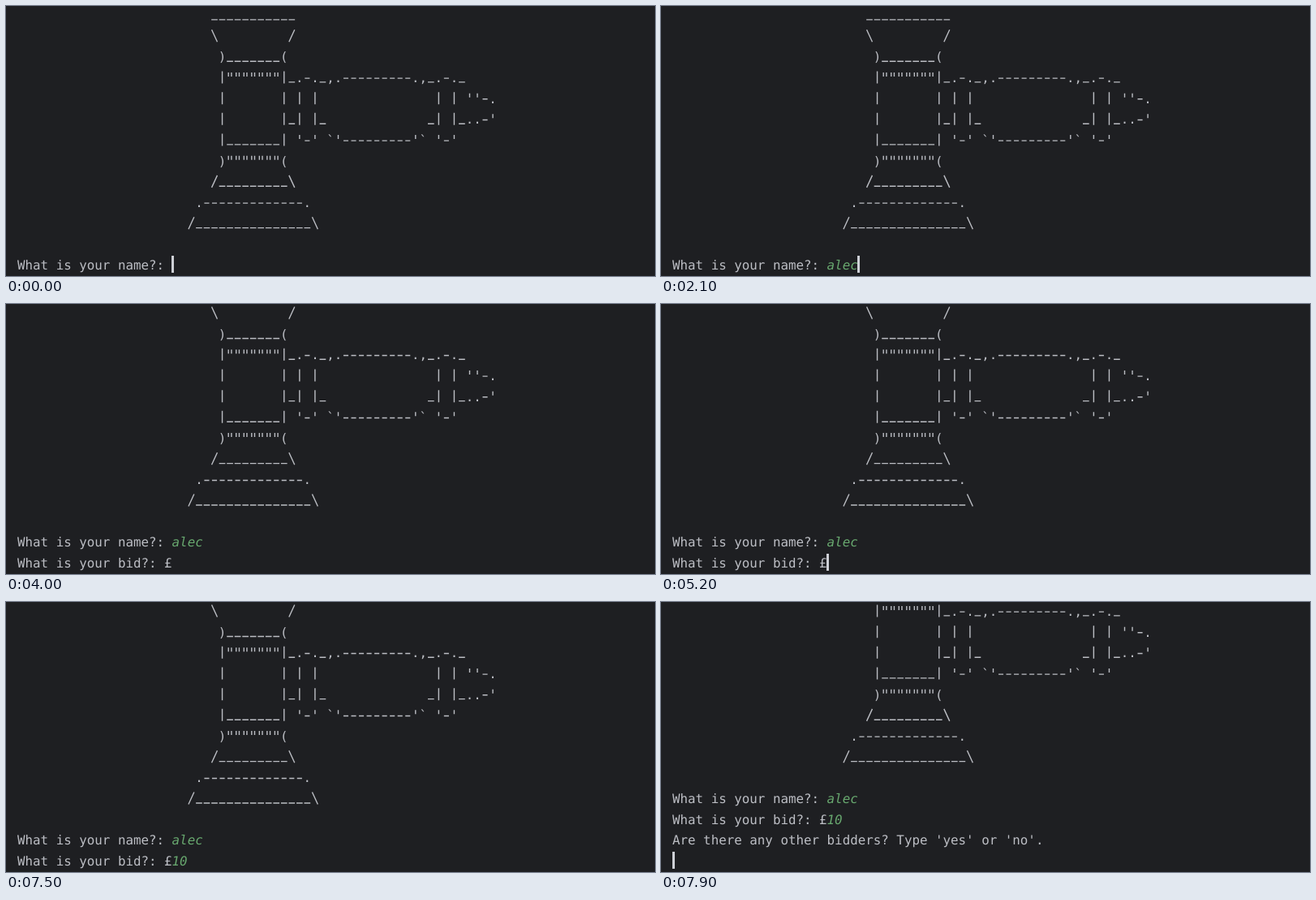
An HTML page for the animation above (8000 ms loop, 800 by 333 pixels).

```html
<!DOCTYPE html>
<html lang="en">
<head>
<meta charset="utf-8">
<title>Auction console</title>
<style>
  html, body { margin: 0; width: 100%; height: 100%; overflow: hidden; background: #1e1f22; }
  svg { display: block; width: 800px; height: 333px; }
  text {
    font: 15.83px "DejaVu Sans Mono", "Noto Sans Mono", monospace;
    fill: #bcbec4;
    white-space: pre;
    text-rendering: geometricPrecision;
  }
  path { fill: none; stroke: #bcbec4; stroke-width: 1.4; }
  .typed { fill: #68a86f; font-style: italic; }
  #caret { fill: #ced0d6; }
</style>
</head>
<body>
<svg viewBox="0 0 800 333"><g id="page"></g><rect id="caret" y="308" width="3" height="21"/></svg>
<script>
const LEFT = 14, CELL = 9.53, ROW = 25.67, BASE = 17;
const LOOP = 8000;

const gavel = String.raw`
                         ___________
                         \         /
                          )_______(
                          |"""""""|_.-._,.---------.,_.-._
                          |       | | |               | | ''-.
                          |       |_| |_             _| |_..-'
                          |_______| '-' ~'---------'~ '-'
                          )"""""""(
                         /_________\
                       .-------------.
                      /_______________\ `
  .slice(1).replaceAll("~", "`").split("\n");

// Line-shaped characters as strokes: x1, y1, x2, y2 from the cell's left edge and baseline
const strokes = {
  "_": [[0.9, -0.1, 8.6, -0.1]],
  "-": [[1.7, -4.9, 7.8, -4.9]],
  "|": [[4.77, -13.5, 4.77, 1.5]],
  "/": [[8.2, -13.5, 1.3, 1.5]],
  "\\": [[1.3, -13.5, 8.2, 1.5]],
  '"': [[2.9, -12, 2.9, -7], [6.6, -12, 6.6, -7]],
  "'": [[4.77, -12, 4.77, -7]],
};

// time, lines scrolled, name typed, bid typed, caret visible
const steps = [
  [0, 0, "", "", true],
  [600, 0, "", "", false],
  [1000, 0, "a", "", true],
  [1200, 0, "al", "", true],
  [1800, 0, "ale", "", true],
  [2000, 0, "alec", "", true],
  [2900, 1, "alec", "", true],
  [3800, 1, "alec", "", false],
  [4200, 1, "alec", "", true],
  [4700, 1, "alec", "", false],
  [5200, 1, "alec", "", true],
  [5800, 1, "alec", "", false],
  [6200, 1, "alec", "", true],
  [6500, 1, "alec", "10", true],
  [7500, 1, "alec", "10", false],
  [7800, 2, "alec", "10", true],
  [7900, 3, "alec", "10", true],
];

const page = document.getElementById("page");
const caret = document.getElementById("caret");
const colX = col => LEFT + col * CELL;
const rowY = row => BASE + row * ROW;

function add(tag, attrs, content = "") {
  const node = document.createElementNS("http://www.w3.org/2000/svg", tag);
  for (const key in attrs) node.setAttribute(key, attrs[key]);
  node.textContent = content;
  return page.appendChild(node);
}

function addText(col, row, content, className = "") {
  return add("text", { x: colX(col), y: rowY(row), class: className }, content);
}

function drawArt(lines) {
  let d = "";
  lines.forEach((line, row) => {
    [...line].forEach((char, col) => {
      if (char === " ") return;
      if (!strokes[char]) return addText(col, row, char);
      const x = colX(col), y = rowY(row);
      for (const [x1, y1, x2, y2] of strokes[char]) {
        d += `M${x + x1} ${y + y1}L${x + x2} ${y + y2}`;
      }
    });
  });
  add("path", { d });
}

drawArt(gavel);
addText(0, 12, "What is your name?: ");
const nameText = addText(20, 12, "", "typed");
const bidPrompt = addText(0, 13, "What is your bid?: £");
const bidText = addText(20, 13, "", "typed");
const question = addText(0, 14, "Are there any other bidders? Type 'yes' or 'no'.");

const show = (node, on) => node.setAttribute("visibility", on ? "visible" : "hidden");

function render(time) {
  const [, scroll, name, bid, caretOn] = steps.findLast(step => step[0] <= time);
  const caretCol = scroll === 0 ? 20 + name.length : scroll === 1 ? 20 + bid.length : 0;
  page.setAttribute("transform", `translate(0 ${-scroll * ROW})`);
  nameText.textContent = name;
  bidText.textContent = bid;
  show(bidPrompt, scroll >= 1);
  show(question, scroll >= 3);
  show(caret, caretOn);
  caret.setAttribute("x", Math.round(colX(caretCol) - 0.4));
}

const start = performance.now();
function tick() {
  render((performance.now() - start) % LOOP);
  requestAnimationFrame(tick);
}
tick();
</script>
</body>
</html>
```
